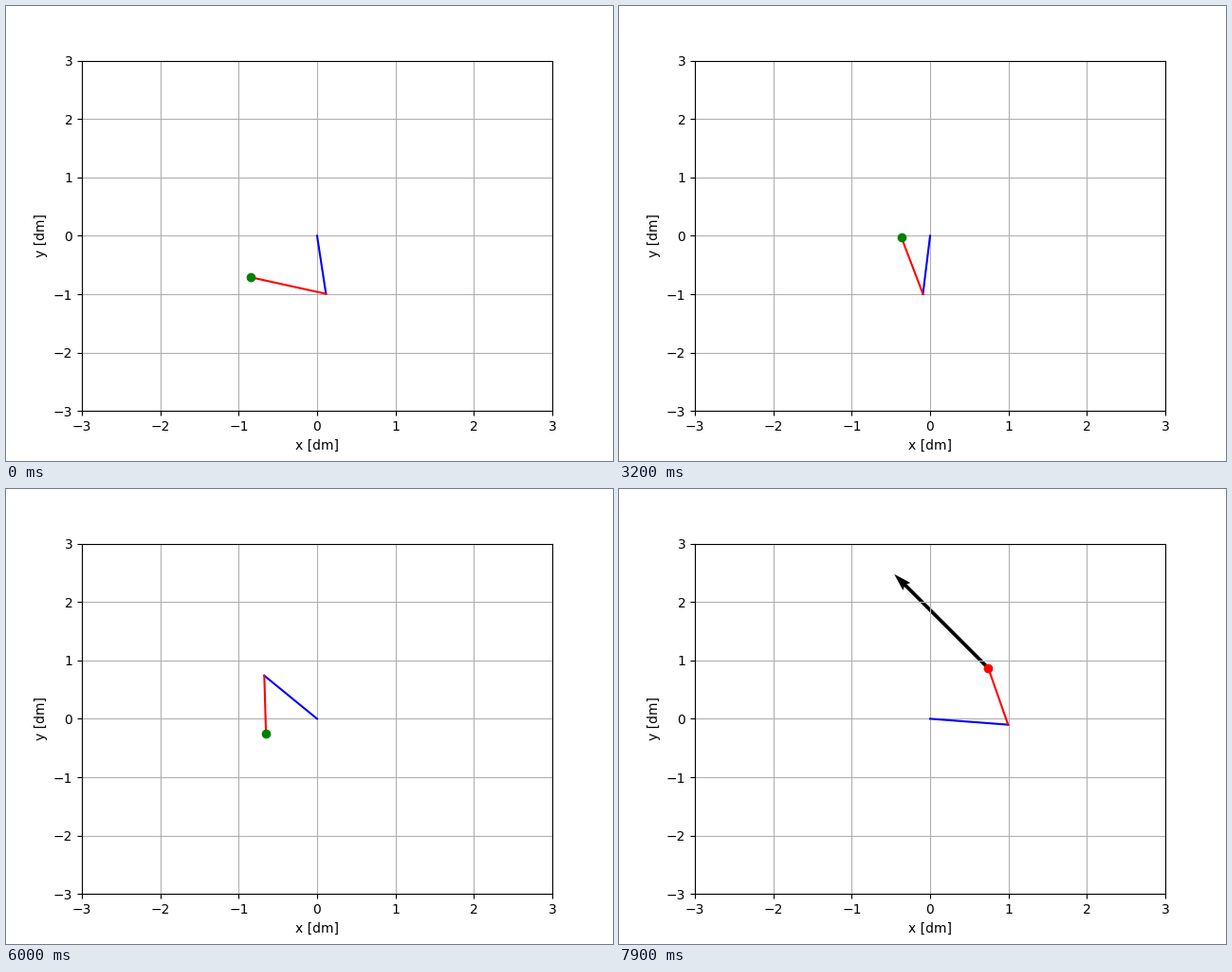
Animation of 640x480 px, one loop 8000 ms. Source, as a matplotlib script:

```python
import numpy as np
import matplotlib.pyplot as plt
from matplotlib.animation import FuncAnimation
from numpy.polynomial import Polynomial

FRAMES = 80
INTERVAL = 100
LAST = FRAMES - 1
RED_FROM = 64  # hand marker turns red here

# Each joint follows one quintic: absolute link angle in degrees, s from 0 to 1
upper = Polynomial([-83.5, -23.8, 301.7, -745.4, -254.4, 439.6])
fore = Polynomial([163.6, -13.0, -158.9, -328.1, -344.0, 425.0])


def unit(degrees):
    a = np.radians(degrees)
    return np.array([np.cos(a), np.sin(a)])


fig, ax = plt.subplots(figsize=(6.4, 4.8), dpi=100)
blue_link, = ax.plot([], [], "b-")
red_link, = ax.plot([], [], "r-")
hand_dot, = ax.plot([], [], "o")
arrow = ax.quiver(0, 0, -1, 1, scale=5)

ticks = range(-3, 4)
ax.set(xlim=(-3, 3), ylim=(-3, 3), xticks=ticks, yticks=ticks,
       xlabel="x [dm]", ylabel="y [dm]")
ax.grid(True)


def update(i):
    s = i / LAST
    elbow = unit(upper(s))
    hand = elbow + unit(fore(s))
    blue_link.set_data([0, elbow[0]], [0, elbow[1]])
    red_link.set_data([elbow[0], hand[0]], [elbow[1], hand[1]])
    hand_dot.set_data([hand[0]], [hand[1]])
    hand_dot.set_color("red" if i >= RED_FROM else "green")
    # The release arrow shows only at the end of the throw
    arrow.set_offsets([hand])
    arrow.set_visible(i == LAST)
    return blue_link, red_link, hand_dot, arrow


anim = FuncAnimation(fig, update, frames=FRAMES, interval=INTERVAL,
                     repeat=True, repeat_delay=0, blit=False)
plt.show()
```
